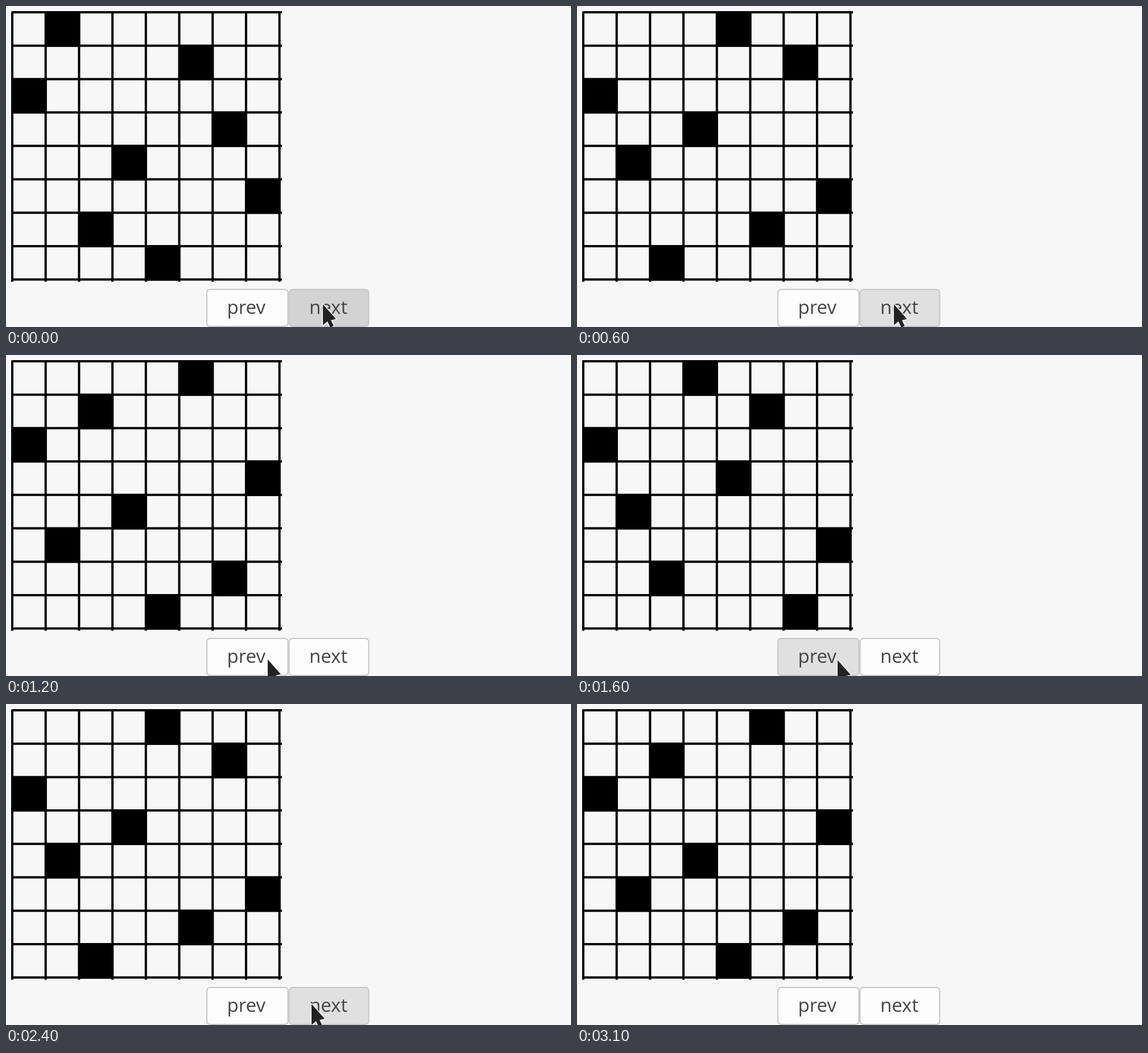
Animation, 993 px wide and 564 px high, one loop 5500 ms. Source, as an HTML page:

```html
<!DOCTYPE html>
<html lang="en">
<head>
<meta charset="utf-8">
<title>Eight queens</title>
<style>
  html, body { margin: 0; width: 100%; height: 100%; overflow: hidden; background: #f7f7f7; }
  svg { display: block; width: 993px; height: 564px; }
  text { font: 33px "Open Sans", "Noto Sans", sans-serif; fill: #444; }
  .btn { stroke: #c6c6c6; stroke-width: 2; }
</style>
</head>
<body>
<svg viewBox="0 0 993 564">
  <rect width="993" height="564" fill="#f7f7f7"/>
  <path id="grid" stroke="#000" stroke-width="4" fill="none"/>
  <g id="queens"></g>
  <rect id="prev" class="btn" x="353" y="498" width="142.5" height="65" rx="6"/>
  <rect id="next" class="btn" x="497.5" y="498" width="140" height="65" rx="6"/>
  <text x="388.5" y="541">prev</text>
  <text x="533" y="541">next</text>
  <path id="cursor" d="M0 0V37L8 30L13 41L19 38L14 28L23 26Z" fill="#222"
        stroke="#f4f4f4" stroke-width="3" stroke-linejoin="round" paint-order="stroke"/>
</svg>
<script>
const N = 8, ORIGIN = 11, CELL = 58.7, LOOP = 5500, STEP = 100;
const $ = id => document.getElementById(id);
const line = i => ORIGIN + i * CELL;

// All solutions in lexicographic order; rows[c] is the queen's row in column c.
function solve(rows, out) {
  if (rows.length === N) out.push(rows);
  else for (let r = 0; r < N; r++) {
    const safe = rows.every((q, c) => q !== r && Math.abs(q - r) !== rows.length - c);
    if (safe) solve([...rows, r], out);
  }
  return out;
}
const boards = solve([2], []);

// Time of each board change, and the button that causes it
const clicks = [
  [100, 'next'], [200, 'next'], [400, 'next'], [600, 'next'], [800, 'next'],
  [1400, 'prev'], [1600, 'prev'], [1700, 'prev'],
  [2200, 'next'], [2400, 'next'], [2600, 'next']
];
const hovers = [[0, 900, 'next'], [1300, 1700, 'prev'], [2100, 2800, 'next']];
const path = [
  [0, 557, 524], [900, 557, 524], [1200, 460, 535], [1600, 458, 536],
  [1700, 458, 536], [1800, 531, 529], [2000, 532, 528], [2400, 537, 527],
  [2800, 537, 527], [3000, 855, 522]
];

let d = '';
for (let i = 0; i <= N; i++) d += `M9.5 ${line(i)}H485M${line(i)} 11V484.5`;
$('grid').setAttribute('d', d);

const queens = boards[0].map((_, c) => {
  const q = document.createElementNS('http://www.w3.org/2000/svg', 'rect');
  q.setAttribute('x', line(c) - 1.5);
  q.setAttribute('width', CELL + 3.5);
  q.setAttribute('height', CELL + 3.5);
  return $('queens').appendChild(q);
});

function shade(name, t) {
  const hit = at => clicks.some(([time, b]) => b === name && time === at);
  if (hit(t)) return '#e0e0e0';
  if (hit(t + STEP)) return '#d3d3d3';
  return hovers.some(([a, b, n]) => n === name && t >= a && t <= b) ? '#e6e6e6' : '#fdfdfd';
}

function place(t) {
  const i = path.findIndex(p => p[0] >= t);
  if (i < 0) return null;
  if (i === 0) return path[0].slice(1);
  const [t0, x0, y0] = path[i - 1], [t1, x1, y1] = path[i];
  const k = (t - t0) / (t1 - t0);
  return [x0 + (x1 - x0) * k, y0 + (y1 - y0) * k];
}

function draw(ms) {
  const t = Math.floor(ms % LOOP / STEP) * STEP;
  const index = clicks.reduce((n, [time, b]) => time > t ? n : n + (b === 'next' ? 1 : -1), 0);
  queens.forEach((q, c) => q.setAttribute('y', line(boards[index][c]) - 1.5));
  for (const name of ['prev', 'next']) $(name).setAttribute('fill', shade(name, t));
  const pos = place(t);
  $('cursor').setAttribute('visibility', pos ? 'visible' : 'hidden');
  if (pos) $('cursor').setAttribute('transform', `translate(${pos})`);
}

const start = performance.now();
function tick() {
  draw(performance.now() - start);
  requestAnimationFrame(tick);
}
tick();
</script>
</body>
</html>
```
